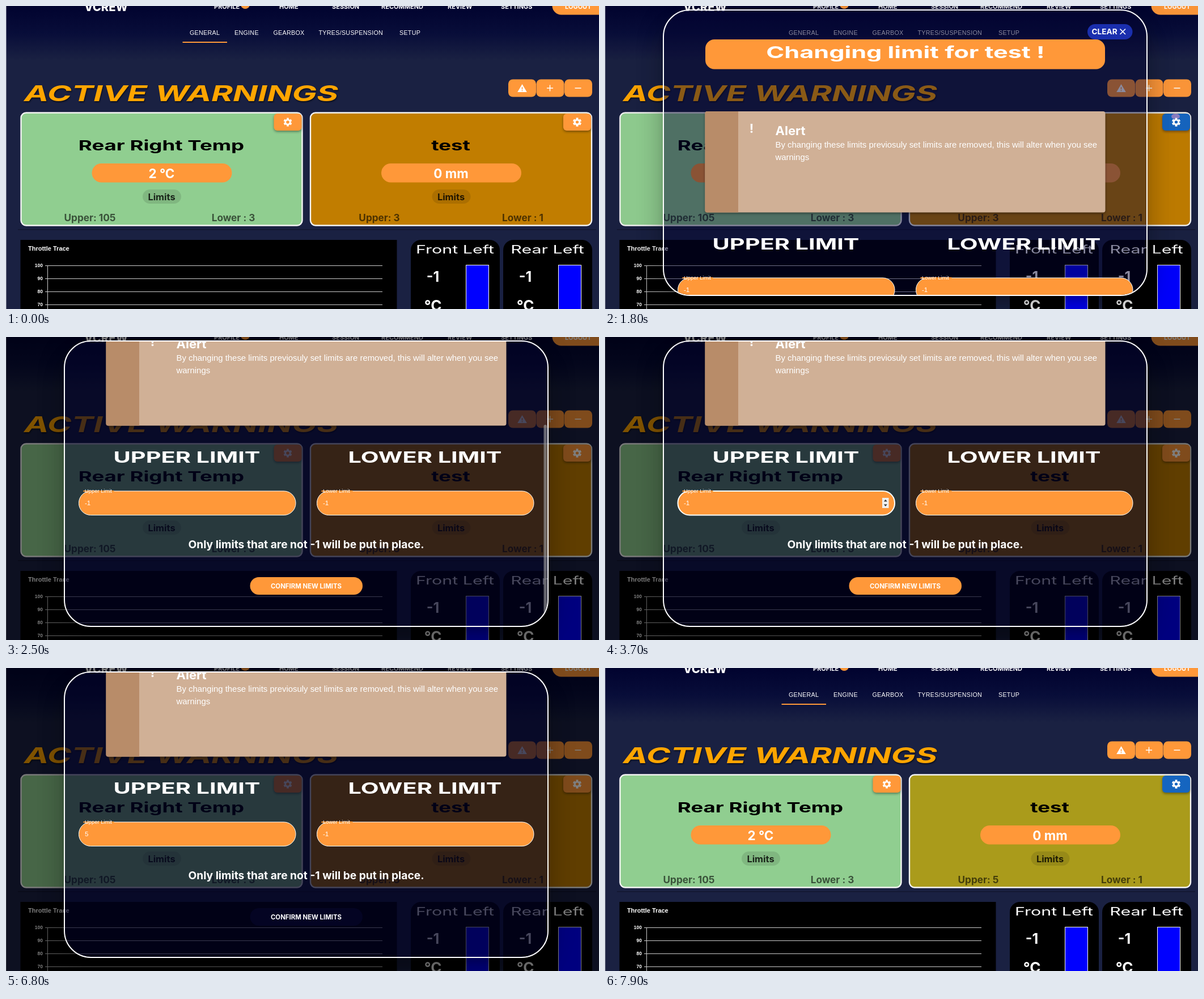
Recreate the animation shown at these times as an HTML page. Size 1046 px wide and 535 px high, loop 8 s.

```html
<!DOCTYPE html>
<html lang="en">
<head>
<meta charset="utf-8">
<title>Warning limits</title>
<style>
  html, body { margin: 0; width: 100%; height: 100%; overflow: hidden; background: #1a2142; }
  svg, div { position: absolute; left: 0; top: 0; }
  svg { width: 1046px; height: 535px; font-family: Inter, sans-serif; }
  .arial { font-family: "Liberation Sans", Arial, sans-serif; }
  #backdrop { width: 1046px; height: 535px; background: #000; }
  #dialog {
    left: 102px; top: 6px; width: 855px; height: 506px; box-sizing: border-box;
    border: 2px solid #fff; border-radius: 48px; overflow: hidden; background: rgba(4, 4, 50, .45);
    box-shadow: 0 11px 15px -7px #0003, 0 24px 38px 3px #00000024, 0 9px 46px 8px #0000001f;
  }
  #dialog svg { left: -104px; top: -8px; }
  .raised { filter: drop-shadow(0 2px 2px #0006); }
  .headline { font-style: italic; filter: drop-shadow(1px 2px 1px #0008); }
</style>
</head>
<body>
<svg id="page"></svg>
<div id="backdrop"></div>
<div id="dialog"><svg id="form"></svg></div>
<script>
const ORANGE = '#ff9839';
const WIDEN = 1.5; // expanded display face
const $ = id => document.getElementById(id);

const rect = (x, y, w, h, fill, r = 0, extra = '') =>
  `<rect x="${x}" y="${y}" width="${w}" height="${h}" rx="${r}" fill="${fill}" ${extra}/>`;
const stroke = (d, color = '#fff', width = 1) =>
  `<path d="${d}" fill="none" stroke="${color}" stroke-width="${width}"/>`;
const text = (s, x, y, size, { fill = '#fff', weight = 700, anchor = 'start', extra = '' } = {}) =>
  `<text x="${x}" y="${y}" font-size="${size}" font-weight="${weight}" fill="${fill}" text-anchor="${anchor}" ${extra}>${s}</text>`;
const centered = (s, x, y, size, fill = '#fff', weight = 700, extra = '') =>
  text(s, x, y, size, { fill, weight, anchor: 'middle', extra });
const plain = (s, x, y, size, weight = 400, extra = '') =>
  text(s, x, y, size, { weight, extra: `class="arial" ${extra}` });
const display = (s, x, y, size, fill = '#fff', weight = 700) =>
  `<g transform="translate(${x} ${y}) scale(${WIDEN} 1)">${centered(s, 0, 0, size, fill, weight)}</g>`;

const gear = (x, y) => `<g fill="none" stroke="#fff">
  <circle cx="${x}" cy="${y}" r="4.2" stroke-width="2.8"/>
  <circle cx="${x}" cy="${y}" r="6.4" stroke-width="2.2" pathLength="6" stroke-dasharray=".56 .44" stroke-dashoffset="-.22"/></g>`;

function card(x, fill, name, value, upper, lower, id) {
  const mid = x + 248.5;
  return rect(x + 1, 188.5, 496, 199, fill, 9, `id="${id}Card" stroke="#f5f5f5" stroke-width="2.4"`) +
    rect(x + 447, 190, 49, 30, ORANGE, 6, `id="${id}Gear" class="raised"`) + gear(x + 471.5, 205) +
    display(name, mid, 254.5, 24.4, '#000') +
    rect(x + 126, 278, 247, 33.5, ORANGE, 16.7) +
    centered(value, mid + .5, 303.5, 22.4) +
    rect(x + 215.5, 324, 68, 25, '#0000001c', 12.5) +
    centered('Limits', mid + .5, 342.5, 16.4, '#000c') +
    centered(`Upper: ${upper}`, mid - 126, 380, 17.2, '#0009', 700, `id="${id}Upper"`) +
    centered(`Lower : ${lower}`, mid + 127, 380, 17.2, '#0009');
}

function wheel(x, name) {
  return rect(x, 413, 157, 150, '#000', 18) + display(name, x + 78, 436.5, 20.3, '#fff', 400) +
    centered('-1', x + 39, 487, 25) + centered('°C', x + 39, 538, 26) +
    rect(x + 97.5, 457.5, 40, 90, '#00f', 0, 'stroke="#fff"');
}

const nav = [['PROFILE', 367], ['HOME', 482], ['SESSION', 575], ['RECOMMEND', 662],
  ['REVIEW', 779], ['SETTINGS', 873]];
const tabs = [['GENERAL', 324], ['ENGINE', 403], ['GEARBOX', 471.5], ['TYRES/SUSPENSION', 551.5], ['SETUP', 694]];

$('page').innerHTML = `
  <linearGradient id="sky" x2="0" y2="1">
    <stop stop-color="#01032f"/><stop offset=".5" stop-color="#080d39"/><stop offset="1" stop-color="#1a2142"/>
  </linearGradient>` +
  rect(0, 0, 1046, 535, '#1a2142') + rect(0, 0, 1046, 96, 'url(#sky)') + rect(0, 0, 1, 535, '#fff6') +
  text('VCREW', 138, 9, 20.3, { weight: 800 }) +
  nav.map(([s, x]) => text(s, x, 4.5, 11)).join('') +
  `<circle cx="422" cy="-3" r="8" fill="${ORANGE}"/>` +
  rect(963.5, -17, 100, 32.5, ORANGE, 16) + text('LOGOUT', 986, 4.5, 11) +
  tabs.map(([s, x]) => plain(s, x, 50.5, 10.7, 400, 'letter-spacing=".0286em"')).join('') +
  rect(311.5, 63, 78.5, 2, ORANGE) +
  `<g class="headline">${display('ACTIVE WARNINGS', 309, 167.5, 38.6, '#ffa500')}</g>` +
  [886, 935.5, 985].map(x => rect(x, 129.5, 49, 31, ORANGE, 8)).join('') +
  '<path d="M910.5 138l8.3 14h-16.6z" fill="#fff"/>' +
  stroke('M910.5 143v4.2m0 1.4v1.7', ORANGE, 1.5) +
  stroke('M954 145h11m-5.5-5.5v11M1003.5 145h11', '#fff', 1.5) +
  card(25.5, '#90ce90', 'Rear Right Temp', '2 °C', 105, 3, 'rear') +
  card(536, '#c17d00', 'test', '0 mm', 3, 1, 'test') +
  '<ellipse id="ripple" cx="1006.5" cy="195" rx="7.5" ry="5" fill="#8c7fc4"/>' + gear(1007.5, 205) +
  rect(21, 394, 1020, 1.5, '#12172f') +
  rect(25.5, 413, 664, 130, '#000') + plain('Throttle Trace', 39, 432, 11, 700) +
  [100, 90, 80, 70].map((n, i) => {
    const y = 458.5 + 23 * i;
    return stroke(`M69 ${y}H664`, '#ccc') +
      text(n, 65, y + 2, 8.5, { anchor: 'end', extra: 'class="arial"' });
  }).join('') + stroke('M73.5 458V535', '#ccc') +
  wheel(714, 'Front Left') + wheel(877, 'Rear Left');

const field = (x, label, notch, id) =>
  rect(x, 480, 382.5, 42.5, ORANGE, 21, `id="${id}Field" stroke="#fff"`) +
  rect(x + 8, 479, notch, 2.2, ORANGE) +
  plain(label, x + 10.5, 482.5, 9.4) + plain('-1', x + 10.5, 505, 11.6, 400, `id="${id}Value"`);

$('form').innerHTML = '<g id="scroller">' +
  rect(851, 32, 79.5, 27, '#1a2fae', 13.5) + text('CLEAR', 858.5, 50, 13.6) +
  stroke('M908.5 40.5l9.5 9.5m0-9.5l-9.5 9.5', '#fff', 1.7) +
  rect(177, 59, 705, 52.5, ORANGE, 16) + display('Changing limit for test !', 530, 92, 28.8) +
  rect(176.5, 186, 706, 178.5, '#d0b096', 4, 'class="raised"') +
  '<path d="M235 186H180q-3.5 0-3.5 3.5V361q0 3.5 3.5 3.5h55z" fill="#b88c69"/>' +
  centered('!', 258.5, 224, 22) + text('Alert', 300.5, 228, 22) +
  plain('By changing these limits previosuly set limits are removed, this will alter when you see', 300.5, 249.7, 14.92) +
  plain('warnings', 300.5, 271.7, 14.92) +
  display('UPPER LIMIT', 319, 429.5, 27.6) + display('LOWER LIMIT', 739, 429.5, 27.6) +
  field(128.5, 'Upper Limit', 54, 'upper') + field(548.5, 'Lower Limit', 55, 'lower') +
  rect(146, 495, 1, 13, '#fff', 0, 'id="caret"') +
  '<g id="spinner">' + rect(489, 492, 11.5, 9, '#efefef', 0, 'id="stepUp"') + rect(489, 501, 11.5, 9, '#efefef') +
  '<path d="M491.8 498.5l3-3.5 3 3.5zm0 5l3 3.5 3-3.5z" fill="#333"/></g>' +
  centered('Only limits that are not -1 will be put in place.', 529.5, 581, 19.2) +
  rect(430.5, 632, 198.5, 31, ORANGE, 15.5, 'id="confirm"') + centered('CONFIRM NEW LIMITS', 529.5, 651.5, 11.4) +
  '</g>' + rect(948.5, 7, 5.5, 355, '#9a9a9a', 2.7, 'id="thumb"');

const ramp = (t, from, to) => Math.min(1, Math.max(0, (t - from) / (to - from)));
const ease = p => p * p * (3 - 2 * p);
const mix = (p, from, to) => `color-mix(in srgb, ${to} ${p * 100}%, ${from})`;
const within = (t, from, to) => t >= from && t < to;
const clicks = [3900, 4500, 5200, 5400, 5600, 5800];

function draw(t) {
  const closing = ramp(t, 6820, 7000);
  $('backdrop').style.opacity = .5 * ease(ramp(t, 1770, 2000)) * (1 - closing);
  $('dialog').style.opacity = ramp(t, 1650, 1780) * (1 - closing);

  const hover = ramp(t, 1560, 1700) * (1 - ramp(t, 1850, 2200)) + ramp(t, 7550, 7850);
  $('testGear').style.fill = mix(hover, ORANGE, '#1565c0');
  $('ripple').style.opacity = within(t, 1750, 1900) ? 1 : 0;

  const saved = t >= 6900;
  $('testCard').style.fill = saved ? '#aa9b1b' : '#c17d00';
  $('testUpper').textContent = `Upper: ${saved ? 5 : 3}`;

  const scroll = 208 * ease(ramp(t, 2340, 2480));
  $('scroller').setAttribute('transform', `translate(0 ${-scroll})`);
  $('thumb').setAttribute('y', 7 + scroll * 148 / 208);
  $('thumb').style.opacity = .65 * ramp(t, 2300, 2400) * (1 - ramp(t, 3350, 3700));

  const value = clicks.filter(c => t >= c).length - 1;
  $('upperValue').textContent = value;
  $('upperField').style.strokeWidth = within(t, 3500, 6600) ? 2 : 1;
  $('caret').style.opacity = within(t, 3900, 6600) ? 1 : 0;
  $('spinner').style.opacity = within(t, 3200, 6600) ? 1 : 0;
  $('stepUp').style.fill = within(t, 3900, 4700) || within(t, 5200, 6100) ? '#969ba3' : '#efefef';
  $('confirm').style.fill = mix(ramp(t, 6550, 6750), ORANGE, '#040423');
}

const start = performance.now();
function tick() {
  draw((performance.now() - start) % 8000);
  requestAnimationFrame(tick);
}
tick();
</script>
</body>
</html>
```
